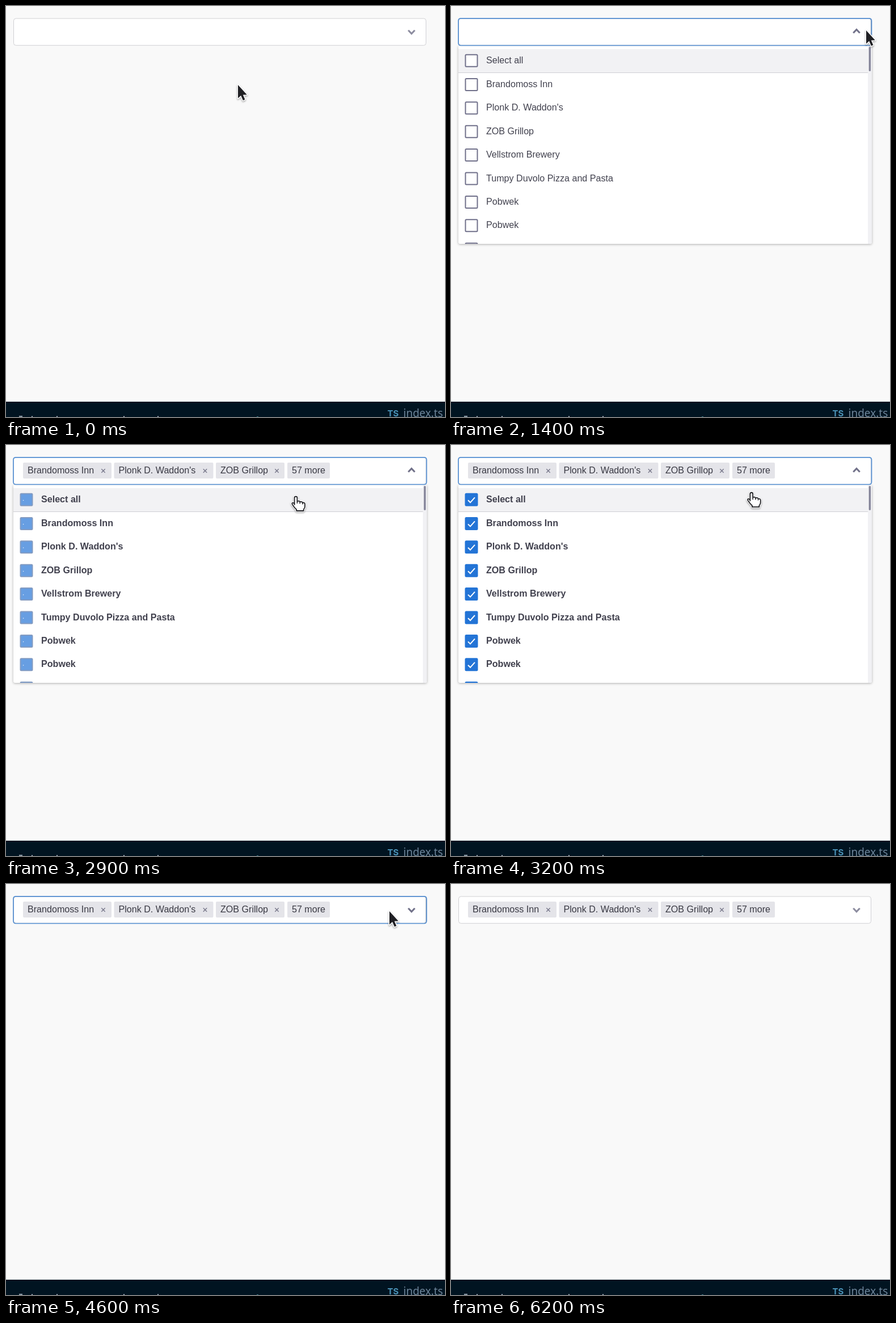
Recreate the animation shown at these times as an HTML page with a canvas. Size 774 by 724 pixels, loop 6.3 s.

```html
<!DOCTYPE html>
<html lang="en">
<head>
<meta charset="utf-8">
<title>Multi-select dropdown</title>
<style>
  html, body { margin: 0; width: 100%; height: 100%; overflow: hidden; background: #f9f9f9; }
  canvas { display: block; }
</style>
</head>
<body>
<canvas id="stage" width="774" height="724"></canvas>
<script>
const ctx = document.getElementById('stage').getContext('2d');
const LOOP = 6300, STEP = 100;
const SANS = '"Liberation Sans", Arial, sans-serif';
const BLUE = '#5590d4', ROW = 41.4;

const places = [
  'Brandomoss Inn', "Plonk D. Waddon's", 'ZOB Grillop', 'Vellstrom Brewery',
  'Tumpy Duvolo Pizza and Pasta', 'Pobwek', 'Pobwek', ''
];
const chips = [
  { x: 30, w: 156, label: places[0], cross: 171.5 },
  { x: 190.5, w: 175, label: places[1], cross: 351 },
  { x: 370, w: 121, label: places[2], cross: 477.5 },
  { x: 496, w: 75, label: '57 more' }
];

// Pointer moves: start time, end time, target x, target y
const moves = [
  [100, 800, 721, 43], [800, 900, 732, 43], [1500, 2100, 511, 91],
  [3100, 3500, 631, 47], [3500, 3900, 717, 39], [4500, 4600, 676, 48],
  [4600, 4900, 612, 7], [5500, 5800, 590, -34]
];

const clamp = v => Math.min(1, Math.max(0, v));
const ramp = (t, a, b) => clamp((t - a) / (b - a));
const ease = p => p * p * (3 - 2 * p);
const mix = (a, b, p) =>
  `rgb(${a.map((v, i) => Math.round(v + (b[i] - v) * p)).join(',')})`;

function pointerAt(t) {
  let x = 409, y = 139;
  for (const [a, b, tx, ty] of moves) {
    const p = ease(ramp(t, a, b));
    x += (tx - x) * p;
    y += (ty - y) * p;
  }
  return { x, y };
}

function box(x, y, w, h, r, fill, stroke, width = 1) {
  ctx.beginPath();
  ctx.roundRect(x, y, w, h, r);
  if (fill) { ctx.fillStyle = fill; ctx.fill(); }
  if (stroke) { ctx.strokeStyle = stroke; ctx.lineWidth = width; ctx.stroke(); }
}

function rect(x, y, w, h, fill) {
  ctx.fillStyle = fill;
  ctx.fillRect(x, y, w, h);
}

function line(points, color, width) {
  ctx.beginPath();
  points.forEach(([x, y]) => ctx.lineTo(x, y));
  ctx.strokeStyle = color;
  ctx.lineWidth = width;
  ctx.stroke();
}

function text(str, x, y, color, font) {
  ctx.font = font;
  ctx.fillStyle = color;
  ctx.fillText(str, x, y);
}

function drawFooter() {
  rect(0, 691, 774, 6, '#fbfbfb');
  rect(0, 697, 774, 27, '#011421');
  text('TS', 672.5, 723, '#4b93b8', 'bold 15px Inter, sans-serif');
  text('index.ts', 700.5, 724, '#6d8499', '19px "Noto Sans", sans-serif');
  rect(23, 722, 6, 1.5, '#b9c6d2');
  for (const x of [45, 89, 207, 267]) rect(x, 722.5, 2, 1.5, '#b9c6d2');
  rect(442, 723, 3, 1, '#3d7d88');
}

function drawField(hover, focus, open, filled) {
  box(13.5, 22, 727, 47.3, 4, '#fff', hover ? '#98989e' : '#d0d0d4');
  if (focus > 0) {
    ctx.globalAlpha = focus;
    box(13, 21.8, 728.5, 47.7, 4, null, BLUE, 1.7);
    ctx.globalAlpha = 1;
  }
  if (filled) {
    for (const c of chips) {
      box(c.x, 31, c.w, 28, 2, '#e4e4e9');
      text(c.label, c.x + 8, 49.5, '#393943', `16.1px ${SANS}`);
      if (!c.cross) continue;
      const x = c.cross, y = 45.5, r = 3.2;
      line([[x - r, y - r], [x + r, y + r]], '#77778a', 1.4);
      line([[x + r, y - r], [x - r, y + r]], '#77778a', 1.4);
    }
  }
  const d = open ? -3 : 3, cy = open ? 44.5 : 45.8;
  line([[709.3, cy - d], [715, cy + d], [720.7, cy - d]],
    hover || open ? '#72728a' : '#8d8da0', 3.1);
}

function drawCheckbox(y, p) {
  if (p <= 0) {
    box(25.5, y - 10.5, 21, 21, 1.5, '#fff', '#70708a', 2);
    return;
  }
  box(25.5, y - 10.5, 21, 21, 1.5,
    mix([106, 160, 226], [35, 116, 214], p), mix([135, 157, 192], [35, 116, 214], p), 2);
  const a = clamp(p * 2.5), b = clamp((p - 0.4) / 0.6);
  const pts = [[30, y + 1], [30 + 4 * Math.max(a, 0.3), y + 1 + 4 * a]];
  if (b > 0) pts.push([34 + 8 * b, y + 5 - 9 * b]);
  line(pts, '#fff', p < 0.2 ? 1.2 : 2);
}

function drawList(alpha, highlight, checked, tick) {
  ctx.save();
  ctx.globalAlpha = alpha;
  ctx.shadowColor = 'rgba(0,0,0,.3)';
  ctx.shadowBlur = 4;
  ctx.shadowOffsetY = 1;
  box(13, 70.5, 729, 348.5, [0, 0, 3, 3], '#fff');
  ctx.shadowColor = 'transparent';
  ctx.clip();
  if (highlight) rect(13, 76, 722, 41, '#f2f2f4');
  rect(13, 117, 722, 1, '#cfcfd4');
  rect(735, 70.5, 7, 349, '#f1f1f4');
  box(736.7, 72, 3.4, 43, 1.7, '#85859a');

  const font = `${checked ? 'bold ' : ''}16.1px ${SANS}`;
  const item = (label, y) => {
    drawCheckbox(y, tick);
    text(label, 62, y + 4.6, '#41414e', font);
  };
  item('Select all', 96.3);
  places.forEach((name, i) => item(name, 138.4 + i * ROW));
  ctx.restore();
}

const arrow = new Path2D('M0 0V23.6L5.2 18.8L8.9 27.2L12.4 25.7L8.8 17.4L15.8 17.2Z');
const hand = new Path2D(
  'M-2.4 14V2Q-2.4 -.4 0 -.4Q2.4 -.4 2.4 2V8.2Q6.4 6.6 7.2 9.2' +
  'Q10.8 8 11.8 10.6Q16 10 16 13.4V17Q16 20 13.6 22.4V25H1.2V22.6' +
  'Q-2.4 19.4 -5 15.4Q-8 11.8 -5.8 10.8Q-4.2 10.2 -2.4 13Z');

function drawPointer({ x, y }, isHand) {
  ctx.save();
  ctx.translate(x, y);
  ctx.lineJoin = 'round';
  ctx.shadowColor = 'rgba(0,0,0,.35)';
  ctx.shadowBlur = 3;
  ctx.shadowOffsetY = 1.5;
  ctx.strokeStyle = '#fff';
  ctx.lineWidth = isHand ? 4 : 3;
  const shape = isHand ? hand : arrow;
  ctx.stroke(shape);
  ctx.shadowColor = 'transparent';
  ctx.fillStyle = isHand ? '#fff' : '#202024';
  ctx.fill(shape);
  if (isHand) {
    ctx.strokeStyle = '#202024';
    ctx.lineWidth = 1.8;
    ctx.stroke(shape);
    line([[2.4, 8.4], [2.4, 12]], '#202024', 1.5);
    line([[7.2, 9.4], [7.2, 12.4]], '#202024', 1.5);
    line([[11.8, 11], [11.8, 13.4]], '#202024', 1.5);
  }
  ctx.restore();
}

function draw(t) {
  const pointer = pointerAt(t);
  const hover = pointer.x < 741 && pointer.y > 21 && pointer.y < 70;
  const alpha = t < 2500 ? ramp(t, 1100, 1400) : 1 - ramp(t, 4000, 4400);
  const open = t >= 1200 && t < 4200;
  const focus = ramp(t, 1100, 1300) * (1 - ramp(t, 5500, 5700));
  const checked = t >= 2900;
  const tick = checked ? Math.max(0.04, ramp(t, 2900, 3200)) : 0;
  const onList = alpha > 0 && pointer.y >= 70;
  const onChevron = open && pointer.x > 700 && pointer.x < 720 || t >= 3900 && t < 4600;

  rect(0, 0, 774, 724, '#f9f9f9');
  drawFooter();
  if (alpha > 0) drawList(alpha, onList || t < 2900, checked, tick);
  drawField(hover, focus, open, checked);
  if (pointer.y > -30) drawPointer(pointer, onList || onChevron);
}

const start = performance.now();
function tick() {
  const t = (performance.now() - start) % LOOP;
  draw(Math.floor(t / STEP) * STEP);
  requestAnimationFrame(tick);
}
tick();
</script>
</body>
</html>
```
